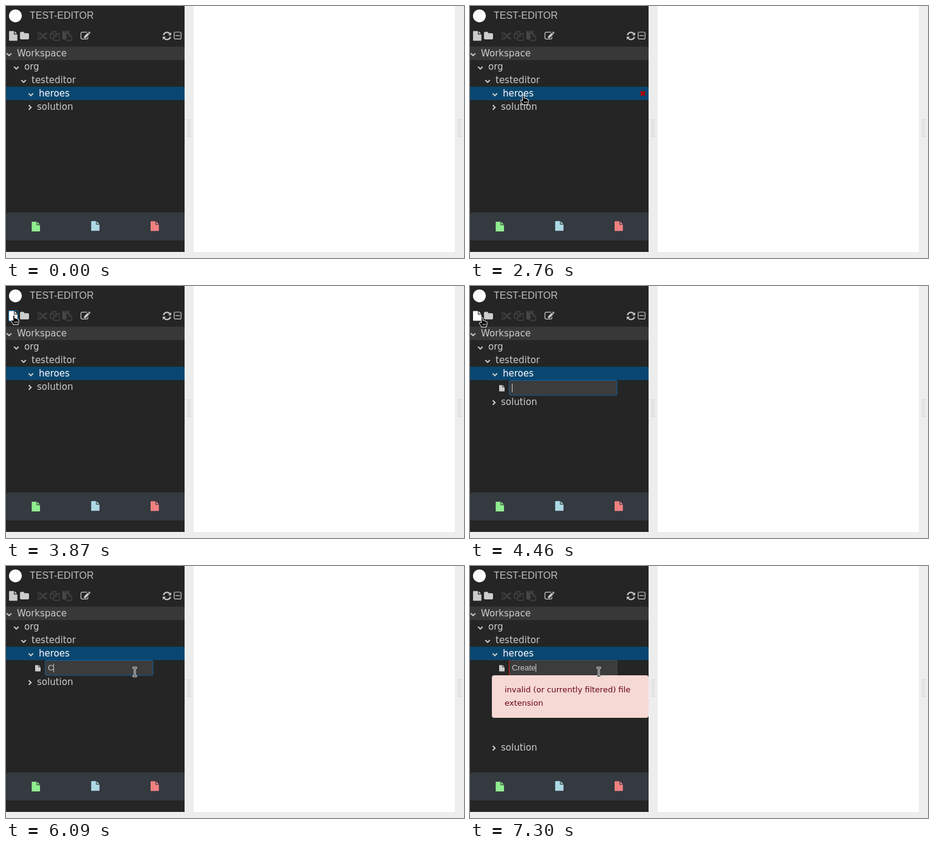
Write an HTML page that moves like this. It is 754 px wide and 415 px high and loops after 8 s.

```html
<!DOCTYPE html>
<html lang="en">
<head>
<meta charset="utf-8">
<title>Test editor</title>
<style>
  html, body { margin: 0; width: 100%; height: 100%; overflow: hidden; background: #ededed; }
  svg { display: block; }
  text { font: 15px "DejaVu Sans", sans-serif; fill: #ccc; white-space: pre; }
  .title { font: 16px "Liberation Sans", Arial, sans-serif; fill: #bfbfbf; }
  .typed { font: 13px "Liberation Sans", Arial, sans-serif; }
  .message text { font-size: 13px; fill: #6b0010; }
  .selected { fill: #fff; }
  .line { fill: none; stroke: currentColor; stroke-width: 1.2; }
  .chevron { fill: none; stroke: #ccc; stroke-width: 2; }
  .icon { fill: currentColor; color: #ccc; }
  .off { color: #484848; }
</style>
</head>
<body>
<svg width="754" height="415" viewBox="0 0 754 415">
  <defs>
    <path id="file" transform="scale(.00893) translate(-128 0)" d="M1152 512v-472q22 14 36 28l408 408q14 14 28 36h-472zm-128 32q0 40 28 68t68 28h544v1056q0 40-28 68t-68 28h-1344q-40 0-68-28t-28-68v-1600q0-40 28-68t68-28h800v544z"/>
    <path id="down" class="chevron" d="M-3.7 -2L0 1.7L3.7 -2"/>
    <pattern id="dots" width="2" height="3" patternUnits="userSpaceOnUse" x="299" y="187">
      <rect width="1" height="1" fill="#b8b8b8"/>
    </pattern>
    <pattern id="dotsRight" href="#dots" x="744"/>
  </defs>

  <rect width="294" height="405" fill="#252525"/>
  <rect x="309" width="430" height="405" fill="#fff"/>
  <rect x="299" y="187" width="5" height="30" fill="url(#dots)"/>
  <rect x="744" y="187" width="5" height="30" fill="url(#dotsRight)"/>

  <circle cx="15.5" cy="16.3" r="10.6" fill="#fff"/>
  <text class="title" x="39" y="21">TEST-EDITOR</text>

  <rect id="focus" x="4.5" y="40.5" width="15" height="17" rx="1" fill="none" stroke="#1177bb"/>
  <g class="icon">
    <use id="newFile" href="#file" x="5" y="41.2"/>
    <path transform="translate(23 41.3)" d="M2 1.2H5Q7 1.2 7 3.2V3.5H12.9Q14.9 3.5 14.9 5.5V11.7Q14.9 13.7 12.9 13.7H2Q0 13.7 0 11.7V3.2Q0 1.2 2 1.2Z"/>
    <g class="off">
      <g class="line" transform="translate(52 41.3)">
        <ellipse cx="3.2" cy="4.3" rx="2.5" ry="1.9" transform="rotate(25 3.2 4.3)"/>
        <ellipse cx="3.2" cy="11.7" rx="2.5" ry="1.9" transform="rotate(-25 3.2 11.7)"/>
        <path d="M5.3 5.6L9 8L15.2 12.6L13.5 13L7.5 9.3M5.3 10.4L9 8L15.2 3.4L13.5 3L7.5 6.7"/>
      </g>
      <path class="line" transform="translate(72.4 41.3)" d="M6.3 12H.6V4.8L4.8.6H9.4V4M.6 5.1H5.1V.6M6.3 8.2L10.4 4H15.4V15.4H6.3ZM6.3 8.5H10.9V4"/>
      <g transform="translate(92.7 41.3)">
        <path fill-rule="evenodd" d="M.8 0H10.6Q11.4 0 11.4.9V3.4H6.5Q5.7 3.4 5.7 4.3V13.7H.8Q0 13.7 0 12.8V.9Q0 0 .8 0ZM2.3 1.1H9.1V2.3H2.3Z"/>
        <path class="line" d="M6.3 4H11L15.4 8.6V15.4H6.3ZM10.9 4V8.6H15.4"/>
      </g>
    </g>
    <g transform="translate(122.8 41.3)">
      <path class="line" d="M12 9.8V11Q12 13.1 9.9 13.1H2.7Q.6 13.1 .6 11V4Q.6 1.8 2.7 1.8H10.6"/>
      <path d="M11.7 2.9L14.3 5.5L8.3 11.5H5.7V8.9ZM12.5 2.1L13.3 1.3Q13.9.8 14.5 1.3L15.9 2.7Q16.4 3.3 15.9 3.9L15.1 4.7Z"/>
    </g>
    <g transform="translate(257 41.3)">
      <path class="line" style="stroke-width:2.1" d="M2.3 6.6A5.8 5.8 0 0 1 12.6 4.4M13.7 9.4A5.8 5.8 0 0 1 3.4 11.6"/>
      <path d="M14.9 1.9V6.9H9.9ZM1.1 14.1V9.1H6.1Z"/>
    </g>
    <g class="line" transform="translate(274.5 41.3)">
      <rect x="2.3" y="1.7" width="11.4" height="11.4" rx="2"/>
      <path d="M4.2 7.4H11.8"/>
    </g>
  </g>

  <rect y="67" width="294" height="22" fill="#383838"/>
  <rect id="hover" width="294" height="22" fill="#2a2d2e"/>
  <rect y="133" width="294" height="22" fill="#094771"/>
  <path id="remove" d="M-3.3 -3.3L3.3 3.3M-3.3 3.3L3.3 -3.3" stroke="#b00000" stroke-width="3.2"/>
  <use href="#down" x="5" y="80"/><text x="18" y="83">Workspace</text>
  <use href="#down" x="17" y="102"/><text x="30" y="105">org</text>
  <use href="#down" x="29" y="124"/><text x="42" y="127">testeditor</text>
  <use href="#down" x="41" y="146"/><text class="selected" x="54" y="149">heroes</text>
  <g id="solution"><path class="chevron" d="M37.5 163.3L41.2 167L37.5 170.7"/><text x="51" y="171">solution</text></g>

  <g id="entry">
    <use class="icon" href="#file" transform="translate(48 163.2) scale(.65)"/>
    <rect id="field" x="64.5" y="155.5" width="177.5" height="24.5" fill="#3c3c3c"/>
    <path id="redEdge" d="M64.5 155V180" stroke="#e51400"/>
    <text id="typed" class="typed" x="69" y="172"></text>
    <rect id="caret" y="161" width="1" height="14" fill="#ccc"/>
  </g>
  <g id="message" class="message">
    <rect x="36" y="180" width="258" height="70" rx="4" fill="#f6d9d4"/>
    <text x="57" y="208">invalid (or currently filtered) file</text>
    <text x="57" y="230">extension</text>
  </g>

  <rect y="340" width="294" height="46" rx="4" fill="#353940"/>
  <use href="#file" x="42.3" y="355.3" fill="#90ee90"/>
  <use href="#file" x="140.2" y="354.3" fill="#add8e6"/>
  <use href="#file" x="238" y="354.6" fill="#f08080"/>

  <g id="cursor">
    <g id="hand">
      <path d="M-1.3 9V1.2Q-1.3 0 0 0T1.3 1.2V5Q3 4.4 3.8 5.6Q5.3 5.1 6 6.3Q8 6 8 8V11.5Q8 13 7 14V15.6H-1.5V14L-4.4 10.3Q-5.3 8.8 -4 8.2Q-2.8 7.8 -1.3 9Z" fill="#000" stroke="#fff"/>
      <path d="M1.5 10V13M3.6 10V13M5.7 10V13" stroke="#fff" stroke-width=".8"/>
    </g>
    <path id="arrow" d="M0 0V14L3.3 11L5.6 16L8 15L5.7 10H10Z" fill="#000" stroke="#fff"/>
    <g id="beam" fill="none">
      <path d="M-3.5 -6.5H3.5M-3.5 7.5H3.5M0 -6.5V7.5" stroke="#fff" stroke-width="3"/>
      <path d="M-3 -6.5H3M-3 7.5H3M0 -6.5V7.5" stroke="#000"/>
    </g>
  </g>
</svg>
<script>
const LOOP = 8000;
const $ = id => document.getElementById(id);
const show = (id, on) => $(id).setAttribute("display", on ? "inline" : "none");
const move = (id, x, y) => $(id).setAttribute("transform", `translate(${x} ${y})`);

const easeOut = p => 1 - (1 - p) ** 2.4;
const easeInOut = p => p * p * (3 - 2 * p);

// Each pointer move advances in a fixed number of discrete steps.
const moves = [
  { start: 1090, end: 1640, steps: 13, from: [220, -6], to: [89, 148], ease: easeOut },
  { start: 2760, end: 3470, steps: 18, from: [89, 148], to: [19, 48], ease: easeInOut },
  { start: 3570, end: 3610, steps: 2, from: [19, 48], to: [13, 48], ease: p => p },
  { start: 4460, end: 4790, steps: 9, from: [13, 48], to: [212, 174], ease: easeInOut }
];
const keys = [[6090, "C"], [6450, "Cr"], [6510, "Cre"], [6940, "Crea"], [7210, "Creat"], [7300, "Create"]];

function pointerAt(t) {
  const m = moves.findLast(m => t >= m.start);
  if (!m) return null;
  const step = Math.floor((t - m.start) / (m.end - m.start) * (m.steps - 1)) + 1;
  const p = m.ease(Math.min(1, step / m.steps));
  return m.from.map((a, i) => Math.round(a + (m.to[i] - a) * p));
}

function drawPointer(t, editing) {
  const pointer = pointerAt(t);
  const [x, y] = pointer || [-99, -99];
  const overFile = x >= 4 && x < 22 && y >= 40 && y < 58;
  const overField = editing && x > 64 && x < 242 && y >= 155 && y < 180;
  const overRow = y >= 67 && y < (editing ? 155 : 177);
  const hand = overFile || overRow;
  const top = 67 + Math.floor((y - 67) / 22) * 22;
  const removable = overRow && top > 67;

  show("cursor", pointer);
  move("cursor", x, y);
  show("hand", hand);
  show("beam", overField);
  show("arrow", !hand && !overField);
  show("hover", removable);
  show("remove", removable);
  move("hover", 0, top);
  move("remove", 284.5, top + 11);
  $("newFile").style.color = overFile ? "#fff" : "";
}

function draw(t) {
  const editing = t >= 3990;
  const invalid = t >= 6180;
  const typed = keys.findLast(([time]) => t >= time)?.[1] || "";

  drawPointer(t, editing);
  show("focus", t >= 3870 && !editing);
  show("entry", editing);
  show("message", invalid);
  show("redEdge", invalid);
  move("solution", 0, invalid ? 133 : editing ? 25 : 0);
  $("field").setAttribute("stroke", invalid ? "#4a4a4a" : "#0e5f9f");
  $("field").setAttribute("rx", invalid ? 0 : 2);
  $("typed").textContent = typed;
  $("caret").setAttribute("x", 69 + Math.floor(typed && editing ? $("typed").getComputedTextLength() : 0));
}

const begin = performance.now();
function frame() {
  draw((performance.now() - begin) % LOOP);
  requestAnimationFrame(frame);
}
frame();
</script>
</body>
</html>
```
